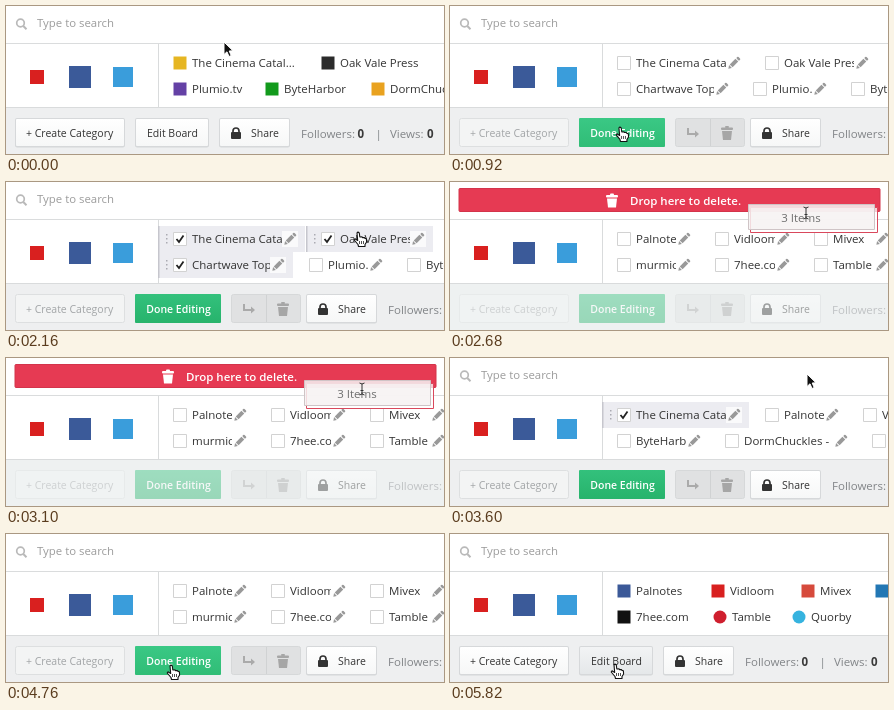
An HTML page with a canvas for the animation above (5.84 s loop, 438 by 148 pixels).

```html
<!DOCTYPE html>
<html lang="en">
<head>
<meta charset="utf-8">
<title>Board editing demo</title>
<style>
html, body { margin: 0; width: 100%; height: 100%; overflow: hidden; background: #fff; }
canvas { display: block; width: 438px; height: 148px; }
</style>
</head>
<body>
<canvas id="stage"></canvas>
<script>
const W = 438, H = 148, LOOP = 5840;
const FONT = '"Open Sans", "Noto Sans", sans-serif';
const canvas = document.getElementById('stage');
const ctx = canvas.getContext('2d');
const dpr = window.devicePixelRatio || 1;
canvas.width = W * dpr;
canvas.height = H * dpr;

// Event times in ms
const T = { edit: 700, pick1: 1360, pick2: 1590, pick3: 1900, drag: 2440,
  drop: 3140, del1: 3300, del2: 3440, del3: 3720, done: 4960 };

// Bookmarks: label and clipped label width in edit mode
const B = {
  film: ['The Cinema Catalogue', 90],
  news: ['Oak Vale Press', 70],
  chart: ['Chartwave Top 100', 78],
  live: ['Plumio.tv', 40],
  tech: ['ByteHarbor', 50],
  fun: ['DormChuckles - Fun', 89],
  pals: ['Palnotes', 40],
  video: ['Vidloom', 41],
  mail: ['Mivex', 41],
  talk: ['murmio', 40],
  jest: ['7hee.com', 41],
  shop: ['Tamble', 41]
};

// View mode entries: icon x, row, colour, round, label
const VIEW_FULL = [
  [167, 0, '#e6b622', 0, 'The Cinema Catal...'],
  [315, 0, '#2b2b2b', 0, 'Oak Vale Press'],
  [167, 1, '#6441a5', 0, 'Plumio.tv'],
  [259, 1, '#129a1c', 0, 'ByteHarbor'],
  [365, 1, '#e9a21f', 0, 'DormChuckles']
];
const VIEW_LESS = [
  [167, 0, '#3b5998', 0, 'Palnotes'],
  [261, 0, '#d8201f', 0, 'Vidloom'],
  [351, 0, '#d64a3c', 0, 'Mivex'],
  [425, 0, '#2377b4', 0, ''],
  [167, 1, '#111', 0, '7hee.com'],
  [263, 1, '#cf1f2e', 1, 'Tamble'],
  [342, 1, '#36b3df', 1, 'Quorby']
];

// Pointer path: time, x, y (hot spot), shape from then on
const PATH = [
  [0, 218, 36, 'arrow'], [100, 217, 38, 'arrow'], [470, 170, 115, 'hand'],
  [580, 167, 119, 'hand'], [760, 168, 120, 'hand'], [940, 170, 121, 'hand'],
  [1020, 172, 110, 'arrow'], [1250, 174, 55, 'hand'], [1420, 174, 56, 'hand'],
  [1540, 174, 80, 'hand'], [1630, 174, 80, 'hand'], [1800, 320, 55, 'hand'],
  [1960, 321, 54, 'hand'], [2120, 352, 50, 'hand'], [2440, 352, 50, 'hand'],
  [2620, 356, 31, 'beam'], [3140, 356, 31, 'beam'], [3141, 356, 25, 'arrow'],
  [3400, 357, 16, 'arrow'], [3800, 357, 16, 'arrow'], [4240, 318, 51, 'arrow'],
  [4600, 172, 126, 'hand'], [4740, 165, 131, 'hand'], [5100, 165, 131, 'hand'],
  [5600, 165, 130, 'hand'], [LOOP, 165, 130, 'hand']
];

const clamp = v => Math.max(0, Math.min(1, v));
const ease = u => u * u * (3 - 2 * u);

function text(s, x, y, color, size = 11.5, weight = 400, align = 'left') {
  ctx.font = `${weight} ${size}px ${FONT}`;
  ctx.fillStyle = color;
  ctx.textAlign = align;
  ctx.fillText(s, x, y);
}

function box(x, y, w, h, fill, stroke, r = 0) {
  ctx.beginPath();
  ctx.roundRect(x, y, w, h, r);
  if (fill) { ctx.fillStyle = fill; ctx.fill(); }
  if (stroke) { ctx.strokeStyle = stroke; ctx.lineWidth = 1; ctx.stroke(); }
}

function line(points, color, width = 1) {
  ctx.beginPath();
  points.forEach(([x, y], i) => i ? ctx.lineTo(x, y) : ctx.moveTo(x, y));
  ctx.strokeStyle = color;
  ctx.lineWidth = width;
  ctx.stroke();
}

function poly(points, fill, stroke, width = 1) {
  ctx.beginPath();
  points.forEach(([x, y]) => ctx.lineTo(x, y));
  ctx.closePath();
  ctx.fillStyle = fill;
  ctx.fill();
  if (stroke) { ctx.strokeStyle = stroke; ctx.lineWidth = width; ctx.stroke(); }
}

function at(x, y, draw, angle = 0) {
  ctx.save();
  ctx.translate(x, y);
  ctx.rotate(angle);
  draw();
  ctx.restore();
}

function shade(top, bottom) {
  const g = ctx.createLinearGradient(0, 112, 0, 141);
  g.addColorStop(0, top);
  g.addColorStop(1, bottom);
  return g;
}

function pencil(x, y) {
  at(x, y, () => {
    box(-4, -2, 8, 4, '#999');
    box(5, -2, 2.5, 4, '#999', null, 1);
    poly([[-5, -2], [-8, 0], [-5, 2]], '#999');
  }, -Math.PI / 4);
}

function trash(x, y, color) {
  at(x, y, () => {
    box(-2, -7, 4, 2, color, null, 1);
    box(-6, -5.5, 12, 2.6, color, null, 1);
    poly([[-5, -2], [5, -2], [4, 7], [-4, 7]], color);
  });
}

function lock(x, y, color) {
  box(x - 5, y - 1, 10, 7, color, null, 1);
  ctx.beginPath();
  ctx.arc(x, y - 2, 3, Math.PI, 0);
  ctx.lineTo(x + 3, y);
  ctx.moveTo(x - 3, y - 2);
  ctx.lineTo(x - 3, y);
  ctx.strokeStyle = color;
  ctx.lineWidth = 1.7;
  ctx.stroke();
}

function button(x, w, label, lx, hover) {
  const fill = hover ? shade('#f3f4f5', '#e4e7e9') : shade('#fff', '#f6f7f7');
  box(x, 112, w, 29.5, '#d6d8da', null, 2);
  box(x + 1, 113, w - 2, 27, fill, null, 1);
  text(label, lx, 131, '#333', 10.5);
}

function share(x) {
  button(x, 71, 'Share', x + 32);
  lock(x + 17, 127, '#333');
}

function frame() {
  box(0, 0, W, H, '#fff');
  box(0, 102, W, 46, '#eeeff0');
  box(0, 37, W, 1, '#dadcdd');
  box(0, 101, W, 1, '#d9dbdc');
  box(152, 38, 1, 63, '#d9dbdc');
  ctx.beginPath();
  ctx.arc(14.5, 17, 3.8, 0, 7);
  ctx.strokeStyle = '#b9b9b9';
  ctx.lineWidth = 1.7;
  ctx.stroke();
  line([[17.3, 20], [20.5, 23.3]], '#b9b9b9', 2);
  text('Type to search', 31, 21, '#9c9c9c', 11.4);
  box(24, 64, 14, 14, '#d9201f');
  box(63, 60, 22, 22, '#3b5a99');
  box(107, 61, 20, 20, '#3a9ddb');
}

function viewList(list) {
  for (const [x, row, color, round, label] of list) {
    const y = 57 + row * 26;
    box(x + .5, y - 6.5, 13, 13, color, null, round ? 6.5 : 0);
    text(label, x + 19, y + 4, '#333');
  }
}

function editItem(key, x, y, checked) {
  const [label, w] = B[key];
  if (checked) {
    box(x - 15, y - 13, w + 57, 26, '#ececf1');
    box(x - 15, y - 13, 1.5, 26, '#c6c6cd');
    for (let i = -1; i < 2; i++) box(x - 7, y - 1 + i * 4, 1.5, 1.5, '#aaaab2');
    box(x + 19 + w, y - 8, 16, 16, '#fafafb');
  }
  box(x + .5, y - 6.5, 13, 13, '#fff', '#d2d2d2');
  if (checked) line([[x + 3.5, y], [x + 6, y + 3], [x + 10.5, y - 3.5]], '#222', 1.8);
  ctx.save();
  ctx.beginPath();
  ctx.rect(x + 19, y - 10, w, 20);
  ctx.clip();
  text(label, x + 19, y + 4, '#333');
  ctx.restore();
  pencil(x + w + 27, y);
}

function editList(t) {
  let rows;
  const lifted = t >= T.drag && t < T.drop;
  if (lifted || t >= T.del3) {
    rows = [['pals', 'video', 'mail'], ['talk', 'jest', 'shop']];
  } else if (t >= T.del2) {
    rows = [['film', 'pals', 'video'], ['tech', 'fun', 'talk']];
  } else if (t >= T.del1) {
    rows = [['film', 'pals', 'video'], ['chart', 'live', 'tech']];
  } else {
    rows = [['film', 'news', 'pals'], ['chart', 'live', 'tech']];
  }
  const picks = { film: T.pick1, chart: T.pick2, news: T.pick3 };
  rows.forEach((row, r) => {
    let x = 167;
    for (const key of row) {
      editItem(key, x, 57 + r * 26, t >= picks[key]);
      x += B[key][1] + 58;
    }
  });
}

function viewBar(hover) {
  button(9, 110, '+ Create Category', 20);
  button(129, 74, 'Edit Board', 141, hover);
  share(213);
  text('Followers:', 295, 131.5, '#828588');
  text('0', 351.5, 131.5, '#3a3a3a', 11.5, 700);
  text('|', 369.5, 131.5, '#828588');
  text('Views:', 384, 131.5, '#828588');
  text('0', 421, 131.5, '#3a3a3a', 11.5, 700);
}

function editBar(hover) {
  box(9.5, 112.5, 109, 28, '#f3f4f4', '#dddfe0', 2);
  text('+ Create Category', 20, 131, '#a2a5a7', 10.5);
  const green = hover ? shade('#3ac885', '#30bd76') : shade('#33c17c', '#27b36c');
  box(129, 112, 86, 29, green, null, 1);
  text('Done Editing', 172.5, 131, '#fff', 10.5, 600, 'center');
  box(225.5, 112.5, 69, 28, '#e0e1e2', '#d6d8d9', 2);
  box(260, 113, 1, 27, '#d0d2d3');
  line([[238, 122], [238, 128], [246, 128]], '#aaa', 2);
  poly([[245, 124.5], [249, 128], [245, 131.5]], '#aaa');
  trash(277, 127, '#a6a6a6');
  share(300);
  text('Followers:', 382, 131.5, '#828588');
}

function dropZone(t) {
  const a = clamp((t - T.drag) / 100) * clamp((T.drop + 80 - t) / 80);
  if (!a) return;
  ctx.save();
  ctx.globalAlpha = a * .57;
  box(0, 102, W, 46, '#f0f2f2');
  ctx.globalAlpha = a;
  box(0, 0, W, 37, '#fff');
  box(9, 6.5, 421, 23, '#e63a53', '#d3344b', 1);
  trash(162, 18.5, '#fff');
  text('Drop here to delete.', 180, 22.5, '#fff', 11.5, 600);
  ctx.restore();
}

function dragStack(t, x, y) {
  if (t < T.drag || t >= T.drop) return;
  at(x - 58, y - 9, () => {
    box(2.5, 3.5, 127, 25, 'rgba(255,255,255,.75)', '#d9485c');
    box(.5, .5, 126, 25, 'rgba(246,243,243,.86)', '#cfc4c6');
    text('3 Items', 53, 17.5, '#6d6d6d', 11.5, 400, 'center');
  });
}

function pointer(kind, x, y) {
  at(x, y, () => {
    ctx.lineJoin = 'round';
    if (kind === 'arrow') {
      poly([[0, 0], [0, 12.5], [3, 9.8], [5, 14.5], [7.2, 13.5], [5.2, 9], [9, 8.8]],
        '#111', '#fff', 1);
    } else if (kind === 'beam') {
      line([[-2.5, -6], [0, -5], [2.5, -6]], '#333');
      line([[0, -5], [0, 5]], '#333');
      line([[-2.5, 6], [0, 5], [2.5, 6]], '#333');
      line([[-1.5, 1.5], [1.5, 1.5]], '#333');
    } else {
      poly([[-1, 1], [0, 0], [1.3, 1], [1.8, 5], [4, 4.8], [4.6, 5.6], [6.4, 5.5],
        [7, 6.4], [8.4, 6.7], [8.6, 10], [7, 12.5], [7, 14.5], [.5, 14.5],
        [0, 12.5], [-3.8, 8], [-3, 6.8], [-.3, 8.5]], '#fff', '#111', 1.1);
      for (let i = 0; i < 3; i++) line([[1.5 + i * 2, 9], [1.5 + i * 2, 12]], '#222', .8);
    }
  });
}

function pointerAt(t) {
  let i = 0;
  while (i < PATH.length - 2 && PATH[i + 1][0] <= t) i++;
  const [t0, x0, y0, kind] = PATH[i], [t1, x1, y1] = PATH[i + 1];
  const u = ease(clamp((t - t0) / (t1 - t0)));
  const shape = t >= T.drag + 60 && t < T.drop ? 'beam' : kind;
  return [shape, x0 + (x1 - x0) * u, y0 + (y1 - y0) * u];
}

function draw(t) {
  ctx.setTransform(dpr, 0, 0, dpr, 0, 0);
  const [kind, x, y] = pointerAt(t);
  const hover = x > 129 && x < 203 && y > 112;
  frame();
  if (t >= T.edit && t < T.done) {
    editList(t);
    editBar(hover);
  } else {
    viewList(t < T.edit ? VIEW_FULL : VIEW_LESS);
    viewBar(hover);
  }
  dropZone(t);
  dragStack(t, x, y);
  pointer(kind, x, y);
}

const start = performance.now();
function tick() {
  draw((performance.now() - start) % LOOP);
  requestAnimationFrame(tick);
}
tick();
</script>
</body>
</html>
```
